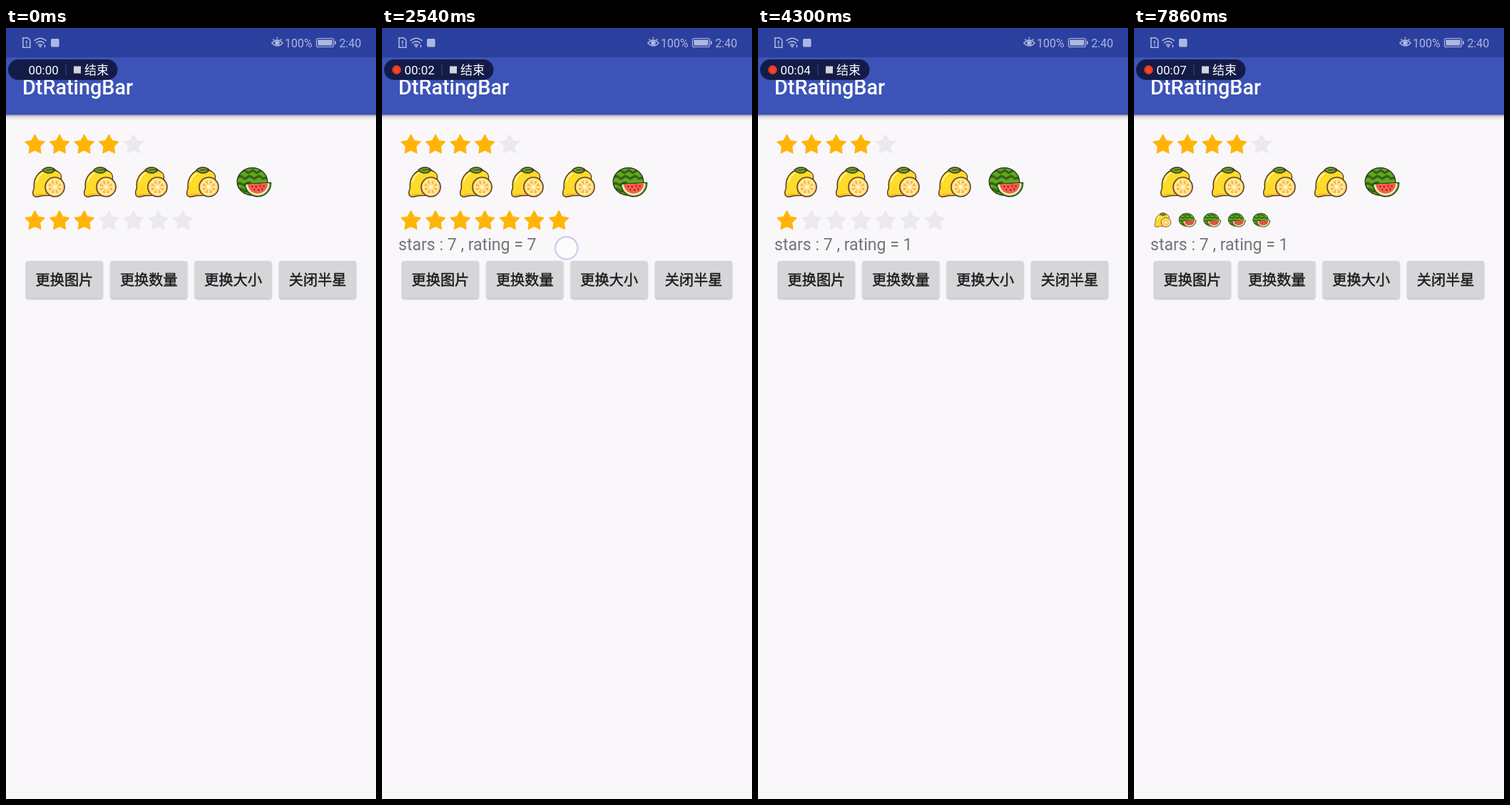
Recreate the animation shown at these times as an HTML page. Size 519 by 1079 pixels, loop 8000 ms.

```html
<!DOCTYPE html>
<html lang="zh-CN">
<head>
<meta charset="utf-8">
<title>DtRatingBar</title>
<style>
  html, body { margin: 0; width: 100%; height: 100%; overflow: hidden; background: #f9f7fa; }
  svg { display: block; width: 519px; height: 1079px; }
  text { font-family: Roboto, "Noto Sans CJK SC", "Noto Sans CJK", sans-serif; }
  .face { fill: #d6d5d7; }
  .label { font-size: 20.2px; font-weight: 500; text-anchor: middle; fill: #1c1b1d; stroke: #1c1b1d; stroke-width: .45px; }
</style>
</head>
<body>
<svg viewBox="0 0 519 1079" xmlns="http://www.w3.org/2000/svg">
  <defs>
    <linearGradient id="shade" x2="0" y2="1">
      <stop stop-color="#000" stop-opacity=".36"/>
      <stop offset=".4" stop-color="#000" stop-opacity=".12"/>
      <stop offset="1" stop-color="#000" stop-opacity="0"/>
    </linearGradient>
    <clipPath id="leftHalf"><rect x="-40" y="-40" width="40" height="80"/></clipPath>
    <clipPath id="rightHalf"><rect y="-40" width="40" height="80"/></clipPath>
    <clipPath id="melonClip"><ellipse cx="-2.500" cy="-1" rx="21.300" ry="19"/></clipPath>
    <path id="starShape" stroke-width="1.6" stroke-linejoin="round"/>
    <g id="star"><use href="#starShape" fill="#ffb406" stroke="#ffb406"/></g>
    <g id="blank"><use href="#starShape" fill="#ebe9ed" stroke="#ebe9ed"/></g>

    <g id="lemon" stroke="#493127" stroke-width="1.4" stroke-linejoin="round">
      <path fill="#fedb2b" d="M-21.500 18.500C-23.500 14-22 11-20.500 8C-22.500-4-15-16.500-3-17.500C3-18.500 9-17.500 13-15C17-12.500 18.500-8 17-4C20 9 8 20-6 18.500C-11 18-15 21-19 20.300Z"/>
      <path fill="#fbb92b" stroke="none" d="M-20.500 17.500C-14 15-8 17-2 14L3 17C-1 18.500-5 18-9 17.500C-14 18-17 20.500-20.500 17.500Z"/>
      <path fill="none" stroke="#fff3a5" stroke-width="2" stroke-linecap="round" d="M-17-1Q-15-9-9-12.500"/>
      <path fill="#63a526" d="M-9-17.500C-4-22 4-22.500 9-17.500C5-11.500-4-11.500-9-17.500Z"/>
      <path fill="none" stroke-width="1" d="M-4-17Q2-18 9-17.500"/>
      <circle cx="8.500" cy="6.500" r="13.600" fill="#ffd25c"/>
      <circle cx="8.500" cy="6.500" r="10.800" fill="#fff6d4" stroke="none"/>
      <circle cx="8.500" cy="6.500" r="9.600" fill="#fdc03a" stroke="none"/>
      <path stroke="#fff8dc" stroke-width="1.500" d="M8.500-4V17M-2 6.500H19M1-1L16 14M16-1L1 14"/>
    </g>

    <g id="melon">
      <ellipse cx="-2.500" cy="-1" rx="21.300" ry="19.200" fill="#65a51e"/>
      <g clip-path="url(#melonClip)" fill="none" stroke="#2c6519" stroke-width="3.200" stroke-linejoin="round">
        <path d="M-20-14L-14-17L-8-13L-2-17L4-13L10-17L18-13"/>
        <path d="M-26-5L-19-9L-13-5L-6-9L0-5L7-9L13-5L22-9"/>
        <path d="M-26 4L-20 1L-14 4L-8 0L0 4M-24 12L-18 9L-12 13L-6 10"/>
      </g>
      <ellipse cx="-2.500" cy="-1" rx="21.300" ry="19.200" fill="none" stroke="#2d3b1d" stroke-width="1.400"/>
      <g transform="translate(5 1.500) rotate(-3)">
        <path fill="#78b83b" stroke="#2d3b1d" stroke-width="1.400" stroke-linejoin="round" d="M-18.300 0H18.600A18.300 18.300 0 0 1-18.300 0Z"/>
        <path fill="#fff2d0" d="M-16 .6H16A16 15.800 0 0 1-16 .6Z"/>
        <path fill="#fb5b4b" d="M-14 .6H14A14 13.600 0 0 1-14 .6Z"/>
        <path stroke="#55251f" stroke-width="1.700" stroke-linecap="round" d="M-8 3.500v.8M-2.500 4v.8M3.500 3.500v.8M8.500 4v.8M-5 8v.8M1 9v.8M6 8v.8"/>
      </g>
    </g>
  </defs>

  <rect width="519" height="1079" fill="#f9f7fa"/>
  <rect y="121" width="519" height="8" fill="url(#shade)"/>
  <rect width="519" height="121.500" fill="#3c54b7"/>
  <rect width="519" height="41" fill="#2b409e"/>

  <g fill="none" stroke="#aeb7df" stroke-width="1.600">
    <path d="M23.800 13.800H30.500L33.700 17V27.200H23.800ZM28.700 17.500V22M28.700 23.500V25"/>
    <path d="M39.500 18Q48 10.500 56.500 18M42.300 21.300Q48 16 53.700 21.300M45 24.300Q48 21.500 51 24.300M54.500 23.500V27"/>
    <path d="M373 21Q380.500 12.500 388 21Q380.500 29 373 21ZM374.500 15.500L376 17M380.500 13V15M386.500 15.500L385 17"/>
    <rect x="435.500" y="14.500" width="24" height="12" rx="2" stroke-width="1.200"/>
  </g>
  <g fill="#aeb7df" font-size="16">
    <circle cx="48" cy="25.800" r="1.500"/>
    <circle cx="380.500" cy="20.700" r="3.300"/>
    <rect x="63" y="15" width="11.500" height="11.500" rx="1.500"/>
    <path d="M437.500 16.500H457.500V24.500H437.500ZM461 18H462.700V23H461Z"/>
    <text x="391" y="26.500">100%</text>
    <text x="467.500" y="26.500">2:40</text>
  </g>

  <text x="23" y="92.700" font-size="28.800" font-weight="500" fill="#fff">DtRatingBar</text>
  <rect x="3" y="44" width="153.500" height="28.700" rx="14.300" fill="#131c47"/>
  <g id="recording">
    <circle cx="20.500" cy="58.500" r="6.200" fill="#e93b24"/>
    <circle cx="20.500" cy="58.500" r="3.500" fill="#f4482c"/>
  </g>
  <path d="M84 51.500V66" stroke="#3d486f"/>
  <rect x="95" y="53.500" width="10" height="10" fill="#d2d3da"/>
  <g font-size="17" fill="#fff">
    <text id="timer" x="31.500" y="65"></text>
    <text x="110" y="65">结束</text>
  </g>

  <g id="rows"></g>
  <text id="status" x="23" y="311" font-size="23.070" fill="#747376"></text>
  <g id="buttons"></g>
  <circle id="touch" r="15.700" fill="#fff" fill-opacity=".6" stroke="#c6c4e9" stroke-opacity=".85" stroke-width="2.200"/>
</svg>

<script>
const LOOP = 8000;
const CELL = 34.6, BAR_LEFT = 23.5;
const INPUT_LAG = 60;
const SECONDS = [780, 1810, 2820, 3840, 4860, 5860, 6860];
const DOT_ON = [200, 1320, 2330, 3350, 4300, 5460, 6340, 7360];
const DRAG = [
  [1490, 117, 274], [1600, 120, 276], [2350, 266, 306], [2540, 259, 308],
  [3320, 87, 304], [3560, 50, 301], [3850, 50, 300]
];
const TAPS = [
  { button: 0, x: 81, y: 346, down: 4610, up: 4900 },
  { button: 1, x: 200, y: 350, down: 6790, up: 7110 }
];

const byId = id => document.getElementById(id);
const clamp = (v, lo = 0, hi = 1) => Math.min(hi, Math.max(lo, v));
const passed = (times, t) => times.filter(time => t >= time).length;

function add(parent, tag, attrs = {}, text = '') {
  const node = document.createElementNS('http://www.w3.org/2000/svg', tag);
  for (const key in attrs) node.setAttribute(key, attrs[key]);
  node.textContent = text;
  return parent.appendChild(node);
}

function show(node, visible) {
  node.style.display = visible ? '' : 'none';
}

function starPath() {
  const points = Array.from({ length: 10 }, (_, i) => {
    const r = i % 2 ? 7.2 : 14;
    const a = (i * 36 - 90) * Math.PI / 180;
    return (r * Math.cos(a)).toFixed(2) + ' ' + (r * Math.sin(a)).toFixed(2);
  });
  return 'M' + points.join('L') + 'Z';
}

byId('starShape').setAttribute('d', starPath());

const rows = byId('rows');
for (let i = 0; i < 5; i++) {
  add(rows, 'use', { href: i < 4 ? '#star' : '#blank', transform: `translate(${40.5 + i * CELL} 163.500)` });
  add(rows, 'use', { href: i < 4 ? '#lemon' : '#melon', transform: `translate(${60 + i * 72} 216)` });
}

const cells = Array.from({ length: 7 }, (_, i) => {
  const group = add(rows, 'g');
  return { group, x: 40.5 + i * CELL, empty: add(group, 'use'), full: add(group, 'use') };
});

const buttons = ['更换图片', '更换数量', '更换大小', '关闭半星'].map((label, i) => {
  const x = 28.2 + i * 118.4;
  const box = { x, y: 326, width: 107.4, height: 52.5, rx: 3 };
  const root = byId('buttons');
  const clip = add(root, 'clipPath', { id: 'button' + i });
  add(clip, 'rect', box);
  const face = add(root, 'rect', { ...box, class: 'face' });
  const ripple = add(root, 'circle', { 'clip-path': `url(#button${i})` });
  add(root, 'text', { class: 'label', x: x + 53.7, y: 360 }, label);
  return { face, ripple };
});

function dragAt(t) {
  let i = 1;
  while (i < DRAG.length - 1 && t > DRAG[i][0]) i++;
  const [t0, x0, y0] = DRAG[i - 1], [t1, x1, y1] = DRAG[i];
  const k = clamp((t - t0) / (t1 - t0));
  return { x: x0 + (x1 - x0) * k, y: y0 + (y1 - y0) * k };
}

function ratingAt(t) {
  if (t < DRAG[0][0]) return 3;
  const position = (dragAt(t - INPUT_LAG).x - BAR_LEFT) / CELL;
  return clamp(Math.ceil(position * 2) / 2, 0.5, 7);
}

function drawBar(t, rating) {
  const fruit = t >= TAPS[0].up + 30;
  const count = t >= TAPS[1].up + 30 ? 5 : 7;
  cells.forEach(({ group, x, empty, full }, i) => {
    const amount = clamp(rating - i);
    show(group, i < count);
    group.setAttribute('transform', fruit ? `translate(${x} 268.800) scale(.51 .48)` : `translate(${x} 270)`);
    full.setAttribute('href', fruit ? '#lemon' : '#star');
    empty.setAttribute('href', fruit ? '#melon' : '#blank');
    show(full, amount > 0);
    show(empty, amount < 1);
    const half = amount === 0.5;
    full.setAttribute('clip-path', half ? 'url(#leftHalf)' : 'none');
    empty.setAttribute('clip-path', half ? 'url(#rightHalf)' : 'none');
  });
}

function drawButtons(t) {
  buttons.forEach(({ face, ripple }, i) => {
    const tap = TAPS.find(item => item.button === i);
    let press = 0;
    if (tap) {
      press = clamp((t - tap.down) / 100) * (1 - clamp((t - tap.up) / 450));
      ripple.setAttribute('cx', tap.x);
      ripple.setAttribute('cy', tap.y);
      ripple.setAttribute('r', 20 + 60 * clamp((t - tap.down) / 300));
    }
    ripple.setAttribute('fill-opacity', press * 0.12);
    face.style.filter = `drop-shadow(0 ${1.5 + press * 2}px ${1.3 + press * 2}px rgba(0,0,0,.3))`;
  });
}

function drawTouch(t) {
  const tap = TAPS.find(item => t >= item.down && t < item.up);
  const dragging = t >= DRAG[0][0] && t < DRAG.at(-1)[0];
  const point = tap || dragAt(t);
  show(byId('touch'), tap || dragging);
  byId('touch').setAttribute('cx', point.x);
  byId('touch').setAttribute('cy', point.y);
}

function draw(t) {
  const rating = ratingAt(t);
  const seconds = passed(SECONDS, t);
  byId('timer').textContent = '00:0' + seconds;
  show(byId('recording'), passed(DOT_ON, t) > seconds);
  byId('status').textContent = t < DRAG[0][0] ? '' : `stars : 7 , rating = ${rating}`;
  drawBar(t, rating);
  drawButtons(t);
  drawTouch(t);
}

const start = performance.now();
function frame() {
  draw((performance.now() - start) % LOOP);
  requestAnimationFrame(frame);
}
frame();
</script>
</body>
</html>
```
